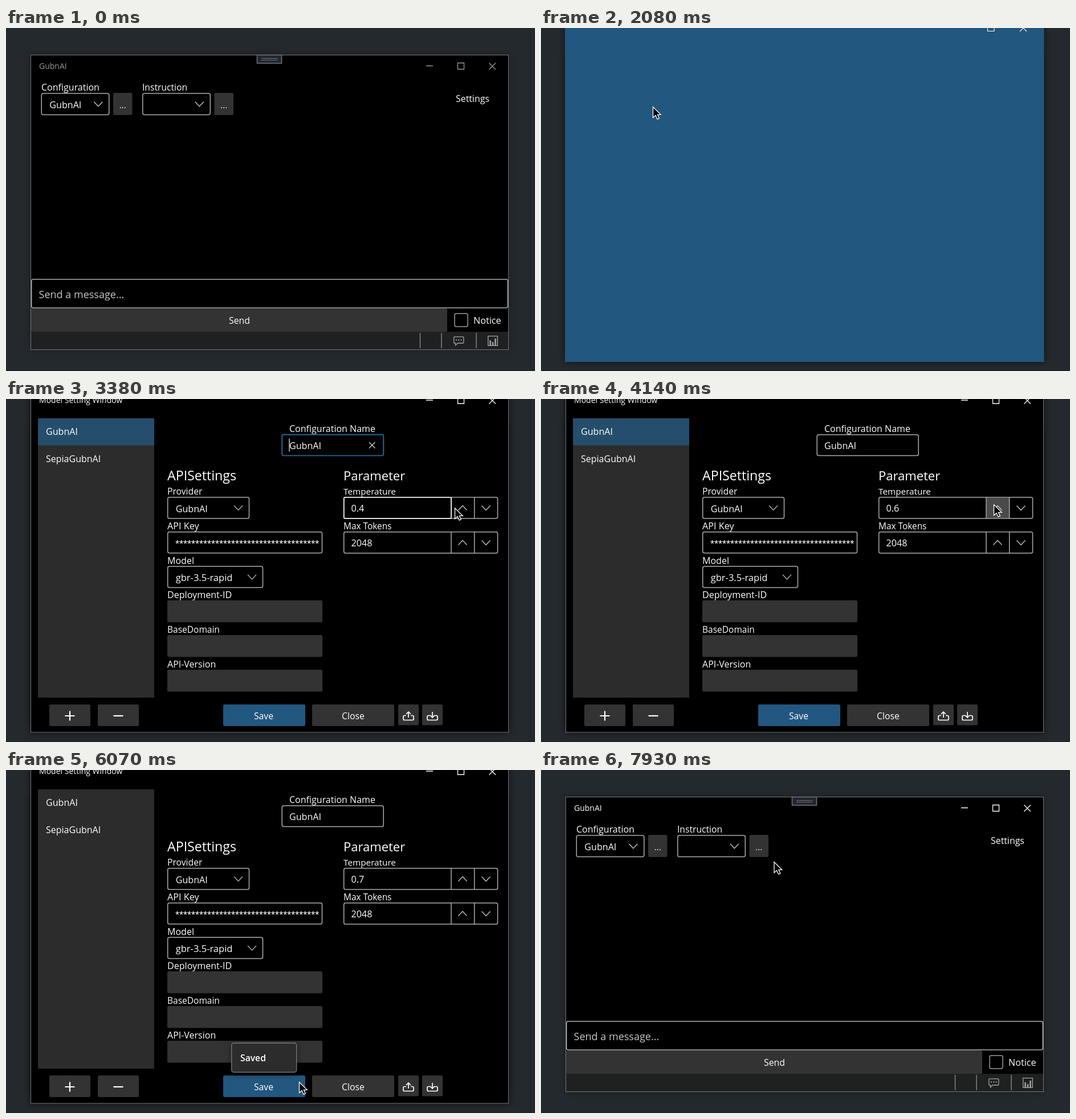
Recreate the animation shown at these times as an HTML page. Size 928 px wide and 603 px high, loop 8000 ms.

```html
<!DOCTYPE html>
<html lang="en">
<head>
<meta charset="utf-8">
<title>Model settings walkthrough</title>
<style>
html, body { margin: 0; width: 100%; height: 100%; overflow: hidden; background: #24292d; }
svg { display: block; width: 100%; height: 100%; }
text { font-family: "Open Sans", sans-serif; fill: #fff; white-space: pre; }
</style>
</head>
<body>
<svg id="stage" viewBox="0 0 928 603"></svg>
<script>
const LOOP = 8000, STEP = 70;
const NAME = 'GubnAI', SECOND = 'SepiaGubnAI', MODEL = 'gbr-3.5-rapid';
const GREY = '#acacac', FILL = '#333', ACCENT = '#22577f';

// Drawing helpers
const text = (x, y, s, size = 16, extra = '') =>
  `<text x="${x}" y="${y}" font-size="${size}" ${extra}>${s}</text>`;
const rect = (x, y, w, h, fill, extra = '') =>
  `<rect x="${x}" y="${y}" width="${w}" height="${h}" fill="${fill}" ${extra}/>`;
const path = (d, color = '#fff', width = 1.2, extra = '') =>
  `<path d="${d}" fill="none" stroke="${color}" stroke-width="${width}" ${extra}/>`;
const frame = (x, y, w, h, extra = '') =>
  rect(x, y, w, h, '#000', `rx="3" stroke="${GREY}" stroke-width="1.5" ${extra}`);
const button = (x, y, w, h, fill = FILL, extra = '') => rect(x, y, w, h, fill, `rx="2.5" ${extra}`);
const chevron = (x, y, up = false, color = '#c8c8c8') => {
  const d = up ? -4 : 4;
  return path(`M${x - 7.5} ${y - d}L${x} ${y + d}L${x + 7.5} ${y - d}`, color, 1.3);
};
const combo = (x, y, w, h, label, size) =>
  frame(x, y, w, h) + text(x + 14, y + 26, label, size) + chevron(x + w - 19, y + h / 2);
const shadow = (y, h, opacity) =>
  rect(43, y, 839, h, '#000', `opacity="${opacity}" filter="url(#blur)"`);
const caption = (y, id) => `<g id="${id}" fill="none" stroke="#fff" stroke-width="1.3">
  <path d="M737 ${y - .5}h12M792.5 ${y - 5.5}h11v11h-11zM847.5 ${y - 5.5}l11.5 11.5M859 ${y - 5.5}l-11.5 11.5"/></g>`;

function mainWindow() {
  const dots = (x, id) => button(x, 114, 33.5, 39, FILL, `id="${id}"`) +
    text(x + 16.7, 141, '...', 15, 'text-anchor="middle"');
  return shadow(47, 519, .3) +
    rect(43.5, 47.5, 838, 518, '#000', 'stroke="#74777a"') +
    rect(440.5, 47.5, 43, 14.5, '#22262e', 'stroke="#70747e" stroke-width="1.5"') +
    path('M448 53.5h28.5M448 56.5h28.5', '#70747e', 1) +
    text(58, 72, NAME, 14, 'id="mainTitle"') + caption(67, 'mainCaption') +
    text(62, 110, 'Configuration') + combo(62.3, 115, 118.5, 37.5, NAME, 16.1) + dots(188, 'editBtn') +
    text(239, 110, 'Instruction', 15.7) + combo(239.8, 115, 118.5, 37.5, '', 16) + dots(365.5, 'noteBtn') +
    text(789, 130, 'Settings', 15.9) +
    frame(44.7, 441.7, 835.6, 50.3, 'id="message"') +
    text(57.5, 475, 'Send a message...', 18, 'style="fill:#c6c6c6"') +
    button(44, 493, 730, 41, FILL, 'id="sendBtn"') + text(409.5, 520, 'Send', 15.9, 'text-anchor="middle"') +
    frame(787, 502, 23, 23, 'stroke-opacity=".9"') + text(820, 519.5, 'Notice', 16.2) +
    rect(44, 534, 837, 31, '#1f2020') +
    path('M726.5 536v27M764 536v27M825 536v27', '#8a8a8a', 1.4) +
    path('M787 542.8h14.5q1.3 0 1.3 1.3v8.6q0 1.3-1.3 1.3h-9l-4 3.8v-3.8h-1.5q-1.3 0-1.3-1.3v-8.6q0-1.3 1.3-1.3z', '#a4a4a4', 1.3) +
    path('M789 548.5h2M793.2 548.5h2M797.4 548.5h2', '#a4a4a4', 2) +
    path('M845.7 541.7h16.6v16.6h-16.6z', '#a4a4a4', 1.3) +
    path('M849.5 558v-9M854 558v-6M858.5 558v-12', '#a4a4a4', 2.5);
}

function spinner(y, id, value) {
  return frame(592.7, y, 269.8, 37.3) +
    rect(781.5, y + 1, 40, 35.3, '#000', `id="${id}Up"`) +
    path(`M781 ${y}v37.3M821.7 ${y}v37.3`, GREY, 1.5) +
    chevron(801, y + 18.8, true) + chevron(842, y + 18.8) +
    text(605.5, y + 25.5, value, 16.2, `id="${id}Value"`);
}

function settingsWindow() {
  const tray = (x, arrow) => button(x, 537, 36, 36.5) +
    path(`M${x + 14} 556.5h-3q-2 0-2 2v4q0 2 2 2h14q2 0 2-2v-4q0-2-2-2h-3M${x + 18} 550v10${arrow}`, '#fff', 1.7);
  const labels = [['Provider', 15.7], ['API Key', 16.2], ['Model', 16],
    ['Deployment-ID', 16.1], ['BaseDomain', 15.5], ['API-Version', 16]];
  return shadow(-20, 607, .6) +
    rect(43.5, -20, 838, 606, '#000', 'stroke="#74777a"') +
    text(58, 7.3, 'Model Setting Window', 14) + caption(2.5, 'setCaption') +
    rect(56, 34, 204, 491, '#2c2c2c') + rect(56, 34, 204, 47.5, '#254d6c', 'id="selected"') +
    text(70, 63, NAME, 16.1) + text(70, 111, SECOND, 16) +
    text(497, 57.5, 'Configuration Name') + frame(484.2, 62.7, 178, 36.8, 'id="nameBox"') +
    text(497, 88, NAME, 16.1) + path('M497 69.5v23', '#fff', 1.2, 'id="caret"') +
    path('M637 76l10.5 10.5M647.5 76l-10.5 10.5', '#ddd', 1.1, 'id="clear"') +
    text(283, 143, 'APISettings', 23.2) + text(592, 143, 'Parameter', 22) +
    labels.map(([s, size], i) => text(283, 168 + i * 60.8, s, size)).join('') +
    combo(283.7, 172.7, 142.8, 37.3, NAME, 16.1) +
    frame(283.7, 233.7, 270.8, 37) +
    text(297, 261, '*'.repeat(36), 18, 'style="font-family:\'Liberation Sans\',sans-serif"') +
    combo(283.7, 294.2, 166.8, 37.3, MODEL, 16.5) +
    [354, 415, 476].map(y => button(283, y, 272, 38.5)).join('') +
    text(592, 168, 'Temperature', 15.3) + spinner(172.7, 'temp', '0.4') +
    rect(592.7, 172.7, 188.3, 37.3, 'none', 'id="tempHover" rx="2" stroke="#fff" stroke-width="1.5"') +
    text(592, 229, 'Max Tokens', 15.4) + spinner(233.7, 'tokens', '2048') +
    button(76, 537, 72, 38) + path('M103.5 557h17M112 548.5v17', '#fff', 2.2) +
    button(161, 537, 72, 38) + path('M188.5 557h17', '#fff', 2.2) +
    button(381, 537, 144, 38, ACCENT, 'id="saveBtn"') + text(452, 563, 'Save', 15.7, 'text-anchor="middle"') +
    button(537, 537, 144, 38, FILL, 'id="closeBtn"') + text(609, 563, 'Close', 15.8, 'text-anchor="middle"') +
    tray(688, 'm-4-6l4-4l4 4') + tray(730, 'm-4-4l4 4l4-4') +
    `<g id="toast">${rect(396, 482, 114, 52, '#000', 'opacity=".5" filter="url(#blur)"')}
      ${rect(395.7, 480, 114, 51.3, '#2c2c2c', 'rx="4" stroke="#7c7c7c" stroke-width="1.3"')}
      ${text(411, 511.5, 'Saved', 15.7, 'font-weight="600"')}</g>`;
}

const stage = document.getElementById('stage');
stage.innerHTML = `
  <defs><filter id="blur" x="-10%" y="-20%" width="120%" height="140%"><feGaussianBlur stdDeviation="6"/></filter></defs>
  ${rect(0, 0, 928, 603, '#24292d')}
  <g id="main">${mainWindow()}</g>
  <g id="splash">${shadow(-20, 607, .6)}${rect(42, -20, 840.5, 607, ACCENT)}
    ${path('M783.5-6h11.5v11.5h-11.5zM840-6l12 12M852-6l-12 12', '#fff', 1.1)}</g>
  <g id="settings">${settingsWindow()}</g>
  ${rect(0, 602, 928, 1, '#1d2125')}
  <path id="cursor" d="M.5.8V19.6L5 15.6L8.2 22.2L11.4 20.7L8.3 14.3H14.2Z" fill="#000" stroke="#fff" stroke-width="1.3"/>`;

const el = {};
stage.querySelectorAll('[id]').forEach(e => el[e.id] = e);
const set = (id, name, value) => el[id].setAttribute(name, value);
const show = (id, on) => set(id, 'display', on ? 'inline' : 'none');

// Pointer stops: start, end, x, y
const MOVES = [
  [580, 1340, 205, 149], [1410, 1680, 196, 138], [2410, 2690, 675, 214],
  [2890, 3380, 787, 191], [3450, 3660, 794, 185], [4740, 4950, 642, 395],
  [5020, 5510, 514, 548], [6140, 6560, 631, 556], [7160, 7930, 408.5, 161]
];

function pointer(t) {
  let x = 668, y = 495;
  for (const [a, b, nx, ny] of MOVES) {
    if (t < a) break;
    const n = Math.round((b - a) / STEP) + 1;
    const p = Math.min(1, (Math.floor((t - a) / STEP) + 1) / n);
    const e = p * p * (3 - 2 * p);
    x += (nx - x) * e;
    y += (ny - y) * e;
  }
  return [x, y];
}

const zoom = (id, s, opacity) => {
  set(id, 'transform', `translate(462 306) scale(${s}) translate(-462 -306)`);
  set(id, 'opacity', opacity);
};

function draw(t) {
  const within = (a, b) => t >= a && t < b;
  const [x, y] = pointer(t);
  const over = (l, top, r, bottom) => t >= 580 && x >= l && x < r && y >= top && y < bottom;

  show('cursor', t >= 580);
  set('cursor', 'transform', `translate(${x} ${y})`);

  const open = within(2150, 6960);
  const active = t >= 6960;
  const tone = active ? '#fff' : '#999';
  el.mainTitle.style.fill = tone;
  set('mainCaption', 'stroke', tone);
  set('editBtn', 'fill', !open && over(188, 114, 222, 153) ? (within(1680, 1880) ? '#555' : '#444') : FILL);
  set('message', 'stroke', !open && over(44, 441, 881, 492) ? '#e4e4e4' : GREY);
  set('sendBtn', 'fill', !open && over(44, 493, 774, 534) ? '#444' : FILL);

  show('splash', within(1880, 2150));
  if (t < 1950) zoom('splash', .93, .4);
  else if (t < 2020) zoom('splash', .98, .85);
  else zoom('splash', 1, 1);

  show('settings', open);
  if (t < 6820) zoom('settings', 1, 1);
  else if (t < 6890) zoom('settings', .97, .6);
  else zoom('settings', .93, .2);

  const focus = t < 3730;
  set('nameBox', 'stroke', focus ? '#255d88' : GREY);
  set('nameBox', 'stroke-width', focus ? 2.2 : 1.5);
  show('clear', focus);
  show('caret', focus && Math.floor((t - 2150) / 530) % 2 === 0);
  show('tempHover', within(3200, 3450));
  const clicks = [3800, 4070, 4340].filter(c => t >= c);
  el.tempValue.textContent = (.4 + clicks.length * .1).toFixed(1);
  const pressed = clicks.some(c => t < c + 100);
  set('tempUp', 'fill', pressed ? '#4a4a4a' : within(3450, 4740) ? '#2b2b2b' : '#000');

  show('selected', t < 5650);
  set('saveBtn', 'fill', within(5580, 5790) ? '#1d4a6c' : ACCENT);
  set('closeBtn', 'fill', over(537, 537, 681, 575) ? '#444' : FILL);
  show('toast', t >= 5930);
  set('toast', 'opacity', t < 6000 ? .5 : 1);
}

const begin = performance.now();
function tick() {
  draw((performance.now() - begin) % LOOP);
  requestAnimationFrame(tick);
}
tick();
</script>
</body>
</html>
```
